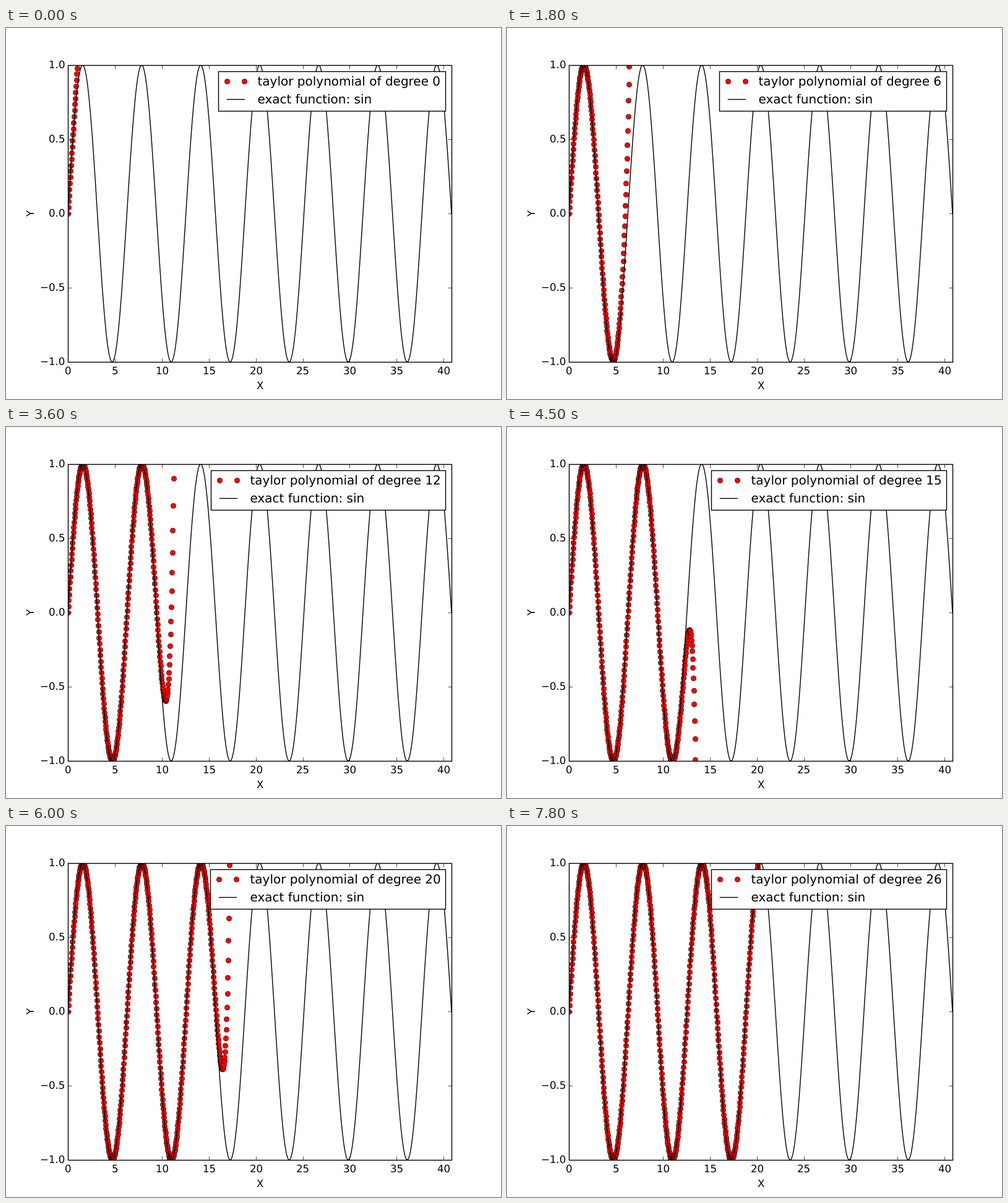
These frames come from a looping animation (800 px wide and 600 px high, 8 s). An HTML page with a canvas:

```html
<!DOCTYPE html>
<html lang="en">
<head>
<meta charset="utf-8">
<title>Taylor polynomials of sin</title>
<style>
html, body { margin: 0; height: 100%; overflow: hidden; background: #fff; }
canvas { display: block; }
</style>
</head>
<body>
<canvas id="plot" width="800" height="600"></canvas>
<script>
const ctx = document.getElementById('plot').getContext('2d');
const STEP = 300, LOOP = 8000;
const SAMPLES = 1000, X_MAX = 13 * Math.PI;
const LINE = 1.389, THIN = 0.694;
const FONT = 'px "DejaVu Sans", sans-serif';
// right ink edge of each digit, in em
const INK = [.570, .544, .536, .556, .580, .549, .573, .551, .568, .566];

const px = x => 100 + 620 * x / X_MAX;
const py = y => 300 - 240 * y;
const snap = v => Math.round(v) + 0.5;
const sampleX = i => X_MAX * i / (SAMPLES - 1);

const dotShape = new Path2D('M0-4C1-4 2-4 3-3C4-2 4-1 4 0C4 1 4 2 3 3C2 4 1 4 0 4' +
  'C-1 4-2 4-3 3C-4 2-4 1-4 0C-4-1-4-2-3-3C-2-4-1-4 0-4Z');

const sine = new Path2D();
for (let i = 0; i < SAMPLES; i++) sine.lineTo(px(sampleX(i)), py(Math.sin(sampleX(i))));

function taylor(x, degree) {
  let term = x, sum = x;
  for (let k = 1; k <= degree; k++) {
    term *= -x * x / (2 * k * (2 * k + 1));
    sum += term;
  }
  return sum;
}

function dot(x, y) {
  ctx.save();
  ctx.translate(snap(x), snap(y));
  ctx.lineWidth = THIN;
  ctx.fillStyle = '#f00';
  ctx.fill(dotShape);
  ctx.stroke(dotShape);
  ctx.restore();
}

function line(x1, y1, x2, y2, width) {
  ctx.lineWidth = width;
  ctx.beginPath();
  ctx.moveTo(x1, y1);
  ctx.lineTo(x2, y2);
  ctx.stroke();
}

function clipped(x, y, w, h, paint) {
  ctx.save();
  ctx.beginPath();
  ctx.rect(x, y, w, h);
  ctx.clip();
  paint();
  ctx.restore();
}

// align: 0.5 centres the text on x, 1 ends it there
function label(text, x, y, align) {
  ctx.fillText(text, Math.round(x - align * ctx.measureText(text).width), y);
}

function drawCurves(degree) {
  clipped(100, 60, 621, 481, () => {
    for (let i = 0; i < SAMPLES; i++) {
      const x = sampleX(i), y = taylor(x, degree);
      if (Math.abs(y) < 1.05) dot(px(x), py(y));
    }
  });
  clipped(100, 60, 620, 480, () => {
    ctx.lineWidth = LINE;
    ctx.stroke(sine);
  });
}

function drawAxes() {
  ctx.lineWidth = LINE;
  ctx.strokeRect(100.5, 60.5, 620, 480);
  ctx.fillStyle = '#000';
  ctx.font = 16.667 + FONT;
  for (let v = 0; v <= 40; v += 5) {
    const x = snap(px(v));
    line(x, 540.5, x, 534.5, THIN);
    line(x, 60.5, x, 66.5, THIN);
    label(String(v), px(v) + 0.5, 560, 0.5);
  }
  for (let v = -1; v <= 1; v += 0.5) {
    const y = snap(py(v));
    line(100.5, y, 106.5, y, THIN);
    line(720.5, y, 714.5, y, THIN);
    label(v.toFixed(1).replace('-', '\u2212'), 95.5, y + 4.5, 1);
  }
  label('X', 410.5, 584, 0.5);
  ctx.save();
  ctx.translate(45, 300);
  ctx.rotate(-Math.PI / 2);
  label('Y', 0, 0, 0.5);
  ctx.restore();
}

function drawLegend(degree) {
  const width = (degree > 9 ? 12.72 : 0) + 20 * INK[degree % 10];
  const edge = 354.1 - width, left = snap(edge);
  const textX = Math.round(417.78 - width) + 0.5;
  ctx.fillStyle = '#fff';
  ctx.fillRect(left, 70.5, 710.5 - left, 64);
  ctx.lineWidth = LINE;
  ctx.strokeRect(left, 70.5, 710.5 - left, 64);
  dot(edge + 14, 86);
  dot(edge + 42, 86);
  line(snap(edge + 14) - THIN, 115.5, snap(edge + 42) + THIN, 115.5, LINE);
  ctx.fillStyle = '#000';
  ctx.font = 20 + FONT;
  ctx.fillText('taylor polynomial of degree ' + degree, textX, 93);
  ctx.fillText('exact function: sin', textX, 122);
}

function frame(now) {
  const degree = Math.floor(now % LOOP / STEP);
  ctx.fillStyle = '#fff';
  ctx.fillRect(0, 0, 800, 600);
  ctx.strokeStyle = '#000';
  ctx.lineJoin = 'round';
  ctx.textRendering = 'geometricPrecision';
  drawCurves(degree);
  ctx.lineJoin = 'miter';
  drawAxes();
  drawLegend(degree);
  requestAnimationFrame(frame);
}
requestAnimationFrame(frame);
</script>
</body>
</html>
```
